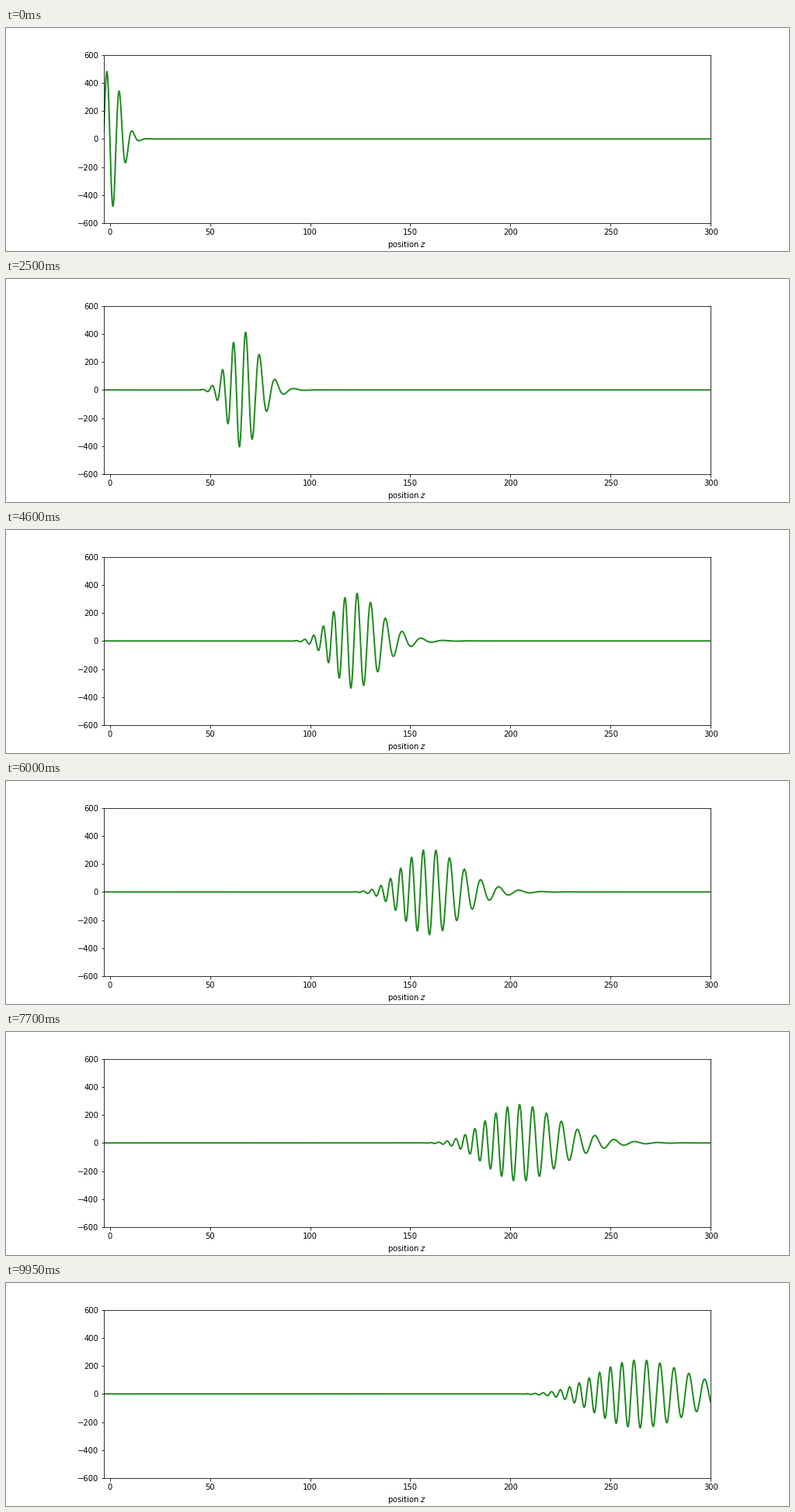
These frames come from a looping animation (1008 by 288 pixels, 10 s). A matplotlib script:

```python
import numpy as np
import matplotlib.pyplot as plt
from matplotlib.animation import FuncAnimation

plt.rcParams.update({
    "figure.dpi": 72,
    "savefig.dpi": 72,
    "font.size": 10,
    "font.family": "DejaVu Sans",
    "figure.subplot.bottom": 0.125,
})

FRAMES = 200
INTERVAL = 50
T_END = 500.0

# Gaussian spectrum in frequency, centred on 1, and the dispersion relation
# k(w) = K0 + K1 (w - 1) + K2 (w - 1)^2
AMPLITUDE = 501.3
SIGMA = 0.1
K0, K1, K2 = 0.990, 1.884, 0.785

z = np.linspace(-3, 300, 10000)
times = np.linspace(0, T_END, FRAMES)

a = 1 / (2 * SIGMA**2)
spread = a + 1j * K2 * z
envelope = AMPLITUDE / np.sqrt(spread / a)


def wave_packet(t):
    """Closed form of the spectral integral of sin(w t - k(w) z)."""
    exponent = 1j * (t - K0 * z) - (t - K1 * z) ** 2 / (4 * spread)
    return (envelope * np.exp(exponent)).imag


fig, ax = plt.subplots(figsize=(14, 4))
ax.set_xlim(-3, 300)
ax.set_ylim(-600, 600)
ax.set_xlabel("position $z$")
line, = ax.plot(z, wave_packet(0), color="forestgreen", lw=2)


def update(frame):
    line.set_ydata(wave_packet(times[frame]))
    return line,


anim = FuncAnimation(fig, update, frames=FRAMES, interval=INTERVAL,
                     repeat=True, repeat_delay=0)
plt.show()
```
